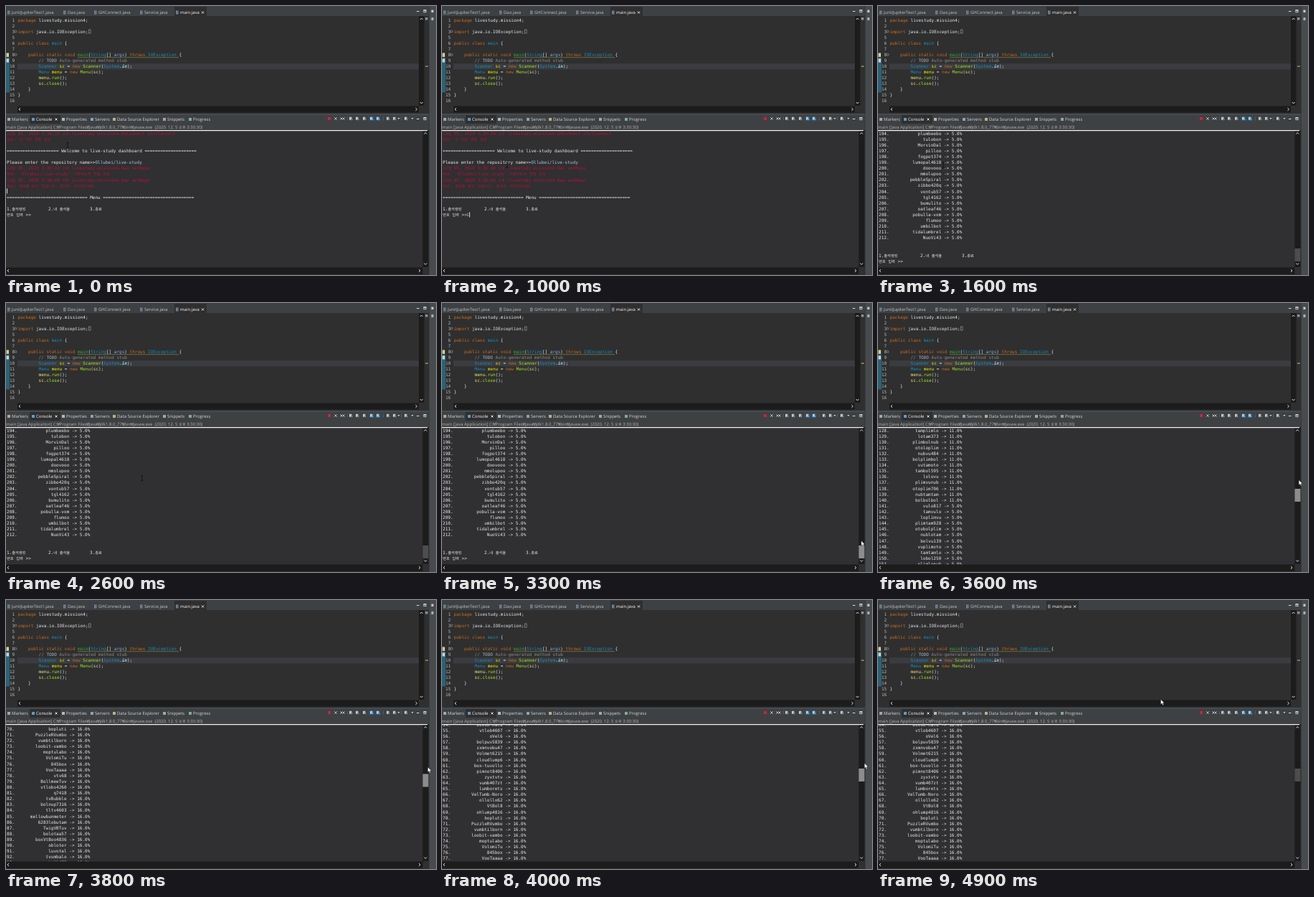
Recreate the animation shown at these times as an HTML page with a canvas. Size 600 by 375 pixels, loop 5 s.

```html
<!DOCTYPE html>
<html lang="ko">
<head>
<meta charset="utf-8">
<title>Console ranking</title>
<style>
html, body { margin: 0; width: 100%; height: 100%; overflow: hidden; background: #2f2f2f }
canvas { display: block; width: 600px; height: 375px }
</style>
</head>
<body>
<canvas id="stage"></canvas>
<script>
const canvas = document.getElementById('stage');
const dpr = window.devicePixelRatio || 1;
canvas.width = 600 * dpr;
canvas.height = 375 * dpr;
const c = canvas.getContext('2d');

const MONO = '"DejaVu Sans Mono", "Noto Sans CJK KR", monospace';
const SANS = '"Open Sans", "Noto Sans CJK KR", sans-serif';
const BG = '#2f2f2f', CONSOLE = '#302f31', TRACK = '#1c1c1c';
const FG = '#ebebeb', RED = '#b51339', INPUT = '#a9cddd';
const CHAR = 3.63, ROW = 8.11;

function box(x, y, w, h, color) {
  c.fillStyle = color;
  c.fillRect(x, y, w, h);
}

function frame(x, y, w, h, color, width = 1) {
  c.strokeStyle = color;
  c.lineWidth = width;
  c.strokeRect(x, y, w, h);
}

function line(points, color, width = 1) {
  c.beginPath();
  points.forEach(([x, y], i) => i ? c.lineTo(x, y) : c.moveTo(x, y));
  c.strokeStyle = color;
  c.lineWidth = width;
  c.stroke();
}

function cross(x, y, color, r = 2) {
  line([[x - r, y - r], [x + r, y + r]], color, 1);
  line([[x - r, y + r], [x + r, y - r]], color, 1);
}

// y is the middle of the row; glyphs are laid out large for exact advances
function text(s, x, y, color = FG, font = MONO, size = 6.03, style = '') {
  c.save();
  c.translate(x, y + 2);
  c.scale(.1, .1);
  c.fillStyle = color;
  for (const run of s.split(/([가-힣]+)/)) {
    const px = /[가-힣]/.test(run) ? size * .87 : size;
    c.font = `${style} ${px * 10}px ${font}`;
    c.fillText(run, 0, 0);
    c.translate(c.measureText(run).width, 0);
  }
  c.restore();
}

const label = (s, x, y, color = '#dcdcdc', size = 6) => text(s, x, y, color, SANS, size);

// keys: [time, value, value, ...]
function track(keys, t) {
  let i = keys.findIndex(k => k[0] > t);
  if (i < 0) return keys[keys.length - 1].slice(1);
  if (i === 0) return keys[0].slice(1);
  const a = keys[i - 1], b = keys[i], p = (t - a[0]) / (b[0] - a[0]);
  return a.slice(1).map((v, j) => v + (b[j + 1] - v) * p);
}

// keyword, type, declared variable, variable, plain, method, call, comment
const K = '#cc6c1d', T = '#1290c3', D = '#f2f200', V = '#f3ec79',
  N = '#e3eaf0', M = '#1eb540', C = '#a7ec21', R = '#8c8c8c';
const code = [
  [1, 0, ['package ', K], ['livestudy.mission4;', N]],
  [2, 0],
  [3, 0, ['import ', K], ['java.io.IOException;', N]],
  [5, 0],
  [6, 0, ['public class ', K], ['main ', T], ['{', N]],
  [7, 0],
  [8, 4, ['public static void ', K], ['main', M], ['(', N], ['String', T], ['[] ', N], ['args', '#79abff'],
    [') ', N], ['throws ', K], ['IOException ', T], ['{', N]],
  [9, 8, ['// ', R], ['TODO ', '#a9b7c6'], ['Auto-generated method stub', R]],
  [10, 8, ['Scanner ', T], ['sc', D], [' = ', N], ['new ', K], ['Scanner', C], ['(', N], ['System', T],
    ['.', N], ['in', '#8ddaf8', 'italic bold'], [');', N]],
  [11, 8, ['Menu ', T], ['menu', D], [' = ', N], ['new ', K], ['Menu', C], ['(', N], ['sc', V], [');', N]],
  [12, 8, ['menu', V], ['.', N], ['run', C], ['();', N]],
  [13, 8, ['sc', V], ['.', N], ['close', C], ['();', N]],
  [14, 4, ['}', N]],
  [15, 0, ['}', N]],
  [16, 0]
];

const known = {};
function addNames(first, list) {
  list.trim().split(/\s+/).forEach((name, i) => known[first + i] = name);
}
addNames(54, `bivoo-nalu vtlob4607 oVel6 bolpuv5839 zxmnvobu47 Volmet6215 cloudlump6
  box-tuvollo pimnot8406 zyxtvtv vumb407zt lumborets VelTumb-Noro ollollo62 VtBol8 ohlump4816
  bopluti PuzzleRVumbo vumbtilborn loobit-vambo moptulabo VolomiTu 845box VooTaaaa vtv68
  BollmeeTuv vtlobs4260 q7418 tvBubble bolnup7316 tltv4603 mellowbunmeter 6283lobutam
  TwigVBTuv bolotaa57 boxVtBoo4836 obloter luvotal tvumbalo LoVi473`);
addNames(188, `tovarelun qp4173 Ollubei vbt3061 munobi rroovv plumbeebo tulobon MorvinDal
  pilloo fogpot374 lumopal4618 doovooo mmolupoo pebbleSpiral zibbo420q vontub57 tgl4162
  bumulito oatleaf46 pobulla-vom flumoo umbilbot tidalumbrel NuoVi43`);

const parts = ['bol', 'vu', 'tam', 'lo', 'plim', 'oto', 'nub'];
const nameOf = n => known[n] ||
  parts[n % 7] + parts[n * 3 % 5] + (n % 3 ? parts[n * 5 % 7] : n * 37 % 900 + 100);

function scrollArrow(x, y, dx, dy, color = '#dcdcdc') {
  const a = [x - dx + dy * 1.9, y - dy + dx * 1.9];
  const b = [x - dx - dy * 1.9, y - dy - dx * 1.9];
  line([a, [x + dx, y + dy], b], color, 1);
}

function windowButtons(y) {
  box(573, y, 3.5, 1, '#dcdcdc');
  frame(583, y - 1.3, 3, 3, '#dcdcdc', .8);
  box(582.6, y - 1.7, 3.8, 1.3, '#dcdcdc');
}

function drawEditor() {
  box(0, 0, 600, 375, '#474b4e');
  box(0, 0, 590, 14, '#3e4143');
  box(235, 1, 45, 14, BG);
  [['JunitJupiterTest1.java', 8], ['Dao.java', 86], ['GHConnect.java', 129],
   ['Service.java', 193], ['main.java', 243]].forEach(([s, x], i) => {
    box(x - 6, 6.5, 3.5, 5, '#78838a');
    box(x - 5.2, 8, 2, 2.3, '#4c78a5');
    label(s, x, 9, i === 4 ? '#ffffff' : '#c4c6c7');
  });
  cross(274.5, 9, '#e5e5e5', 1.5);
  windowButtons(7);

  box(0, 14, 590, 136, BG);
  box(576, 14, 7.5, 125, TRACK);
  scrollArrow(579.7, 18, 0, -1);
  scrollArrow(579.7, 135, 0, 1);
  box(585, 16, 3.5, 3.5, '#8b9194');
  box(585, 83.5, 4, 1.2, '#b9a86a');
  box(16, 80.3, 560, 8.1, '#3b3c40');
  box(0, 72, 5, 48.5, '#2b6277');
  box(0.5, 65.5, 3.5, 5.5, '#d5cf9a');
  box(0.5, 73.5, 3.5, 5, '#c5d6e0');
  code.forEach(([num, indent, ...runs], i) => {
    const y = 19.5 + i * 8.07;
    let x = 16.5 + indent * CHAR;
    text(String(num), num < 10 ? 8.5 : 5, y, '#b4b9bc', MONO, 6);
    for (const [s, color, style] of runs) {
      text(s, x, y, color, MONO, 6.03, style);
      x += s.length * CHAR;
    }
  });
  c.strokeStyle = '#9fa8ad';
  c.lineWidth = .6;
  for (const y of [35.5, 67.9]) {
    c.beginPath();
    c.arc(13.5, y, 1.5, 0, 7);
    c.stroke();
  }
  frame(115.5, 33, 2.6, 5, '#9fa8ad', .6);
  line([[100, 71.7], [241, 71.7]], '#8f8144', .7);
  box(16, 139.5, 560, 9, TRACK);
  scrollArrow(19, 144, -1, 0);
  scrollArrow(572.5, 144, 1, 0);
}

function drawTools() {
  const y = 157;
  box(449, y - 2, 4, 4, '#d1203e');
  cross(460, y, '#b7babc', 1.8);
  cross(468, y, '#b7babc', 1.6);
  cross(471, y, '#b7babc', 1.6);
  for (const x of [506, 515]) box(x, y - 3.5, 8, 7, '#2f4f66');
  for (const x of [481, 490, 500, 510, 519, 533, 542, 558]) {
    box(x - 2, y - 2.2, 3.4, 4, '#c3c8cb');
    box(x, y, 2.4, 2.2, x > 505 && x < 525 ? '#55a7dc' : '#7d868b');
  }
  for (const x of [476, 526, 551]) box(x, y - 2.5, .6, 5, '#666b6e');
  for (const x of [548, 567]) {
    c.fillStyle = '#dcdcdc';
    c.beginPath();
    c.moveTo(x - 1.5, y - 1);
    c.lineTo(x + 1.5, y - 1);
    c.lineTo(x, y + 1);
    c.fill();
  }
  windowButtons(y);
}

function drawPanel() {
  box(0, 152, 590, 12, '#3e4143');
  box(33, 152, 43, 12, BG);
  [['Markers', 8, '#b0a3a0'], ['Console', 42, '#5d9bd0'], ['Properties', 84, '#b4babd'],
   ['Servers', 124, '#88a5b9'], ['Data Source Explorer', 155, '#b9b184'],
   ['Snippets', 225, '#a9a6a0'], ['Progress', 261, '#7fae92']].forEach(([s, x, color]) => {
    box(x - 6, 156, 4, 4, color);
    label(s, x, 158, s === 'Console' ? '#ffffff' : '#d6d8d9');
  });
  cross(70, 158, '#e5e5e5', 1.5);
  drawTools();
  box(0, 164, 590, 9, '#3e4042');
  label('main [Java Application] C:₩Program Files₩Java₩jdk1.8.0_77₩bin₩javaw.exe  (2020. 12. 5 오후 3:30:30)',
    0, 168.7, '#b4b4b4');
}

function drawMenu(y) {
  text('1.출석랭킹', 1, y);
  text('2.내 출석율', 59, y);
  text('3.종료', 117, y);
  text('번호 입력 >>', 1, y + ROW);
}

function drawDashboard(t) {
  const stamp = s => `12월 05, 2020 3:30:${s} 오후 livestudy.mission4.`;
  text(stamp(39) + 'GHConnect initConnect', 1, 177.7, RED);
  text('정보: 깃 허브 연동 성공', 1, 185.8, RED);
  text('='.repeat(20) + ' Welcome to live-study dashboard ' + '='.repeat(20), 1, 202);
  text('Please enter the repository name>>', 1, 218);
  text(known[190] + '/live-study', 1 + 34 * CHAR, 218, INPUT);
  text(stamp(40) + 'Dao setRepo', 1, 226.2, RED);
  text(`정보: '${known[190]}/live-study' 리포지토리 연결 성공`, 1, 234.4, RED);
  text(stamp(40) + 'Dao setRepo', 1, 242.6, RED);
  text('정보: 정보를 읽고 있습니다. 잠시만 기다려주세요.', 1, 250.7, RED);
  text('='.repeat(31) + ' Menu ' + '='.repeat(35), 1, 267);
  drawMenu(283);
  const typed = t >= 1000;
  if (typed) text('1', 34, 291.1, INPUT);
  if (typed) box(38, 287.5, .8, 7, '#ffffff');
  else box(1, 254.5, .8, 7, '#ffffff');
}

function drawRanking(top) {
  const first = Math.floor(top) - 1;
  for (let n = first; n <= Math.min(212, first + 26); n++) {
    const rate = n <= 100 ? '16.0%' : n <= 140 ? '11.0%' : '5.0%';
    const entry = `${nameOf(n)} -> ${rate}`;
    const y = 177.5 + (n - top) * ROW;
    text(n + '.', 1, y);
    text(entry, 117.3 - entry.length * CHAR, y);
  }
  drawMenu(177.5 + (215 - top) * ROW);
}

const mouseKeys = [
  [0, 86, 194], [600, 91, 222], [2500, 91, 222], [3000, 585, 331.5], [3300, 585, 331.5],
  [3500, 586.5, 253.5], [3800, 588.5, 233], [4000, 589.5, 227.5], [4300, 589.5, 227.5],
  [4800, 394.5, 138.5]
];
// first visible rank, scroll thumb position
const scrollKeys = [
  [3300, 194, 338], [3500, 187.88, 275.5], [3600, 128, 259], [3700, 92, 249],
  [3800, 69.7, 242.5], [4000, 54.45, 235]
];

function drawMouse(x, y) {
  if (x < 580 && y > 172) {
    line([[x - 1.5, y - 3.5], [x + 1.5, y - 3.5]], '#111', .8);
    line([[x, y - 3.5], [x, y + 3.5]], '#111', .8);
    line([[x - 1.5, y + 3.5], [x + 1.5, y + 3.5]], '#111', .8);
    return;
  }
  c.beginPath();
  [[0, 0], [0, 7], [1.6, 5.6], [2.8, 8.2], [4, 7.6], [2.9, 5.2], [5, 5]]
    .forEach(([dx, dy]) => c.lineTo(x + dx, y + dy));
  c.closePath();
  c.fillStyle = '#ffffff';
  c.fill();
  c.strokeStyle = '#111';
  c.lineWidth = .4;
  c.stroke();
}

function draw(t) {
  c.setTransform(dpr, 0, 0, dpr, 0, 0);
  c.textRendering = 'geometricPrecision';
  drawEditor();
  drawPanel();
  box(0, 173, 590, 202, CONSOLE);

  const listed = t >= 1300;
  const [top, thumb] = track(scrollKeys, t);
  const [mouseX, mouseY] = track(mouseKeys, t);
  c.save();
  c.beginPath();
  c.rect(0, 174, 580, 190.5);
  c.clip();
  if (listed) drawRanking(top);
  else drawDashboard(t);
  c.restore();

  box(581.5, 174, 8, 190, TRACK);
  const hovered = mouseX > 580;
  if (listed) box(581.5, thumb, 8, 18, hovered ? '#8c8c8c' : '#4d4d4d');
  scrollArrow(585.3, 177.5, 0, -1);
  scrollArrow(585.3, 359.5, 0, 1);
  box(0, 364.5, 581.5, 9.5, TRACK);
  scrollArrow(3, 369, -1, 0);
  scrollArrow(577, 369, 1, 0);
  box(0, 173, 588, 1.2, '#f4f4f4');
  box(590, 0, 1, 375, '#35393b');
  box(593.5, 5.5, 3, 3.5, '#c6cbce');
  box(593.5, 16, 3, 4, '#a6b4bd');
  drawMouse(mouseX, mouseY);
}

function tick() {
  draw(Math.floor(performance.now() % 5000 / 100) * 100);
  requestAnimationFrame(tick);
}
tick();
</script>
</body>
</html>
```
